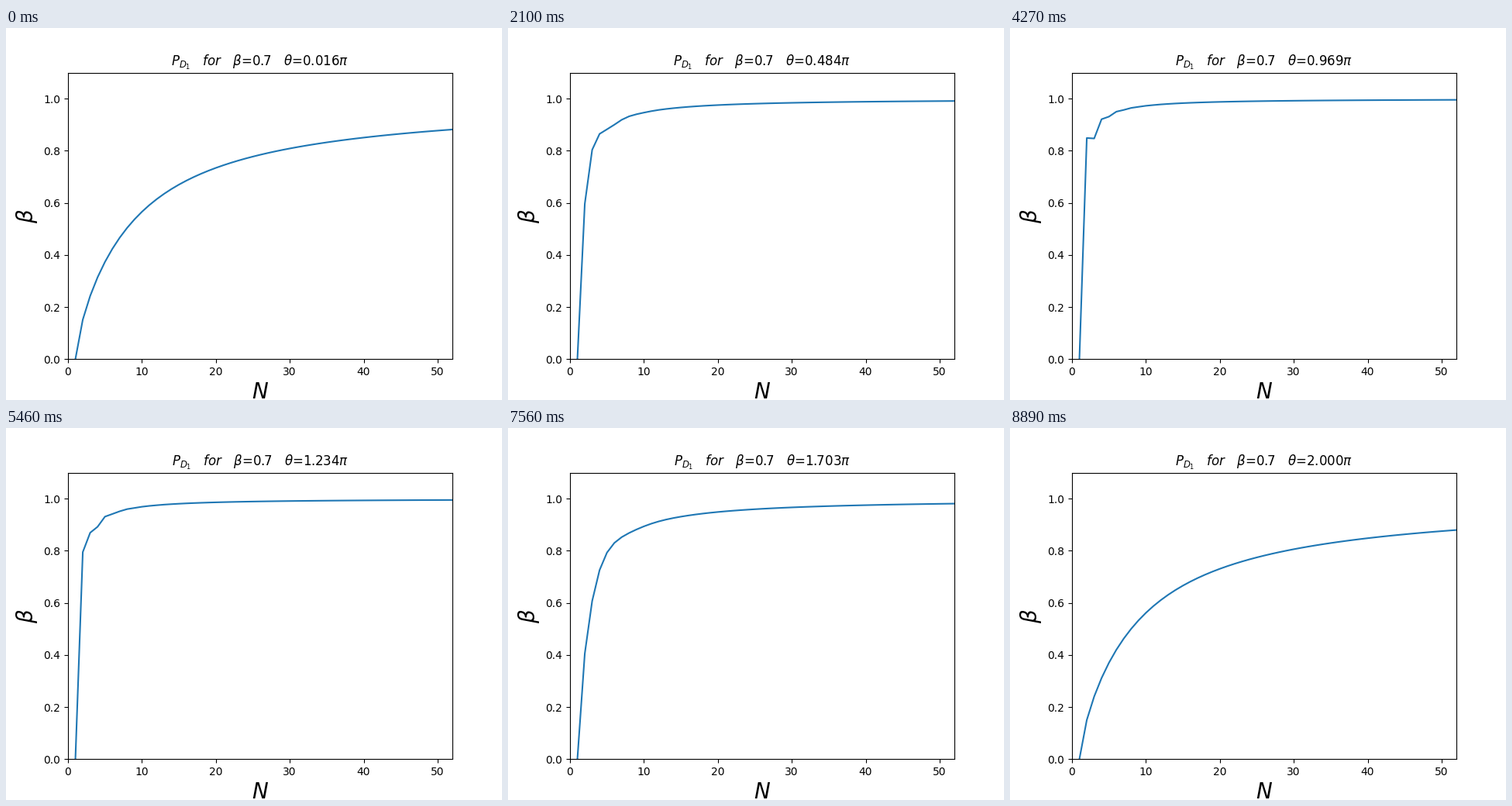
A matplotlib script for the animation above (8960 ms loop, 640x480 px).

```python
import numpy as np
import matplotlib.pyplot as plt
from matplotlib.animation import FuncAnimation

BETA = 0.7
STEPS = 128
N_MAX = 52
counts = np.arange(1, N_MAX + 1)


def amplitude(n, t):
    """Amplitude left in the first arm after n splitters with transmission t between them."""
    c, s = np.cos(np.pi / (2 * n)), np.sin(np.pi / (2 * n))
    a, b = c, s
    for _ in range(n - 1):
        b = b * t
        a, b = c * a - s * b, s * a + c * b
    return abs(a)


fig, ax = plt.subplots(figsize=(6.4, 4.8), dpi=100)
line, = ax.plot([], [])
ax.set_xlim(0, N_MAX)
ax.set_ylim(0, 1.1)
ax.set_xlabel(r"$N$", fontsize=20)
ax.set_ylabel(r"$\beta$", fontsize=20)
title = ax.set_title("")


def update(i):
    turn = 2 * (i + 1) / STEPS
    t = BETA * np.exp(1j * np.pi * turn)
    line.set_data(counts, [amplitude(n, t) for n in counts])
    title.set_text(rf"$P_{{D_1}}$   $for$   $\beta$={BETA}   $\theta$={turn:.3f}$\pi$")
    return line, title


anim = FuncAnimation(fig, update, frames=STEPS, interval=70, repeat=True)
plt.show()
```
